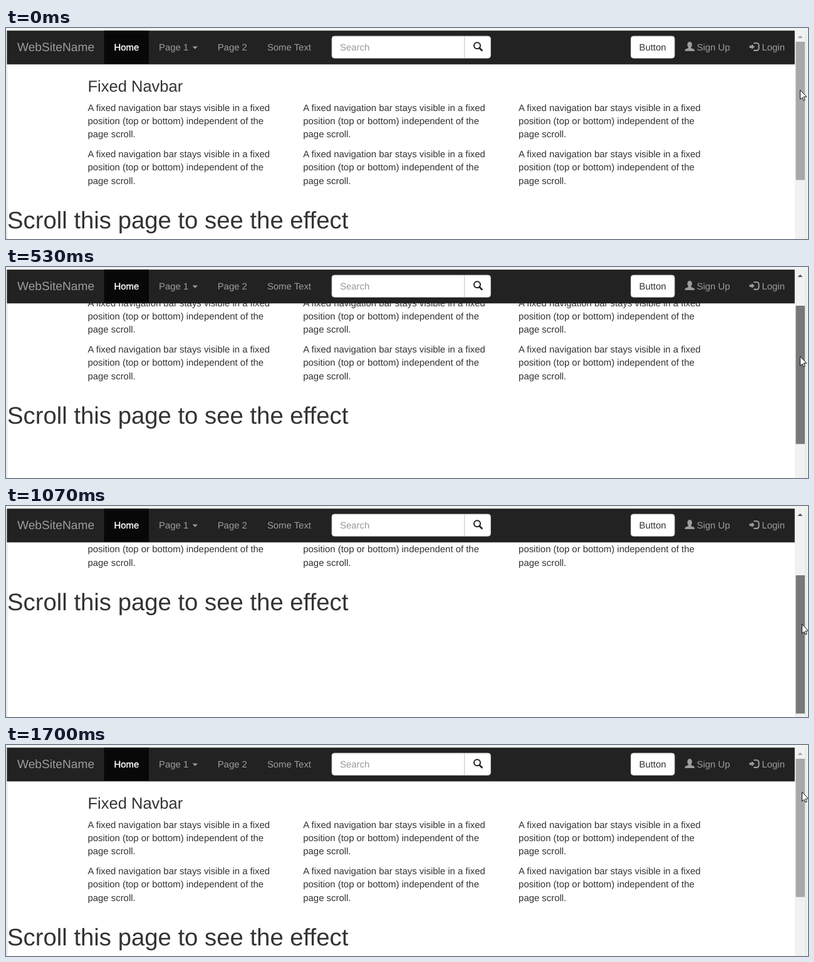
An HTML page that plays this animation: 1280x338 px, repeating every 1770 ms.

```html
<!DOCTYPE html>
<html lang="en">
<head>
<meta charset="utf-8">
<title>Fixed navbar</title>
<style>
  html, body { margin: 0; width: 100%; height: 100%; overflow: hidden; background: #fff; }
  svg { display: block; width: 1280px; height: 338px; }
  text {
    font: 14.9px "Liberation Sans", Arial, sans-serif;
    fill: #333;
    text-rendering: geometricPrecision;
  }
  .h1 { font-size: 38.3px; }
  .h3 { font-size: 25.53px; }
  .nav text { fill: #9d9d9d; }
  .nav .brand { font-size: 19.15px; }
  .nav .active { fill: #fff; stroke: #fff; stroke-width: .35px; }
  .nav .hint { fill: #999; }
  .nav .dark { fill: #333; }
  .box { fill: #fff; stroke: #ccc; }
  .icon { fill: #9d9d9d; }
</style>
</head>
<body>
<svg viewBox="0 0 1280 338">
  <rect width="1280" height="338" fill="#fff"/>

  <g id="page">
    <text class="h3" x="130.5" y="102">Fixed Navbar</text>
    <g id="columns"></g>
    <text class="h1" x="2" y="321">Scroll this page to see the effect</text>
  </g>

  <rect width="1280" height="4" fill="#eff4f3"/>
  <rect width="1" height="338" fill="#f3f4f4"/>
  <rect x="1" y="4" width="1" height="334" fill="#d6d8d8"/>
  <rect x="1259" y="4" width="17" height="334" fill="#f1f1f1"/>
  <rect x="1276" y="4" width="4" height="334" fill="#f0f4f4"/>
  <rect x="1276" y="4" width="1" height="334" fill="#dcdede"/>

  <g class="nav">
    <rect x="1.5" y="4.2" width="1257.3" height="54.1" fill="#222"/>
    <rect x="156.5" y="4.2" width="71.5" height="53.2" fill="#080808"/>
    <text class="brand" x="18" y="37">WebSiteName</text>
    <text class="active" x="172.5" y="36">Home</text>
    <text x="244" y="36">Page 1</text>
    <path class="icon" d="M297.5 29.5h8.6l-4.3 4.3z"/>
    <text x="337.7" y="36">Page 2</text>
    <text x="416.9" y="36">Some Text</text>

    <path class="box" d="M731.8 13.1H524.1a4 4 0 0 0-4 4V44.3a4 4 0 0 0 4 4H731.8z"/>
    <path class="box" d="M731.8 13.1H769.4a4 4 0 0 1 4 4V44.3a4 4 0 0 1-4 4H731.8z"/>
    <text class="hint" x="533" y="36">Search</text>
    <g fill="none" stroke="#222">
      <circle cx="752" cy="28.3" r="5" stroke-width="2"/>
      <path d="M755.6 32l4 4" stroke-width="2.6" stroke-linecap="round"/>
    </g>

    <rect class="box" x="997.4" y="13.1" width="69.6" height="35.2" rx="4"/>
    <text class="dark" x="1010.5" y="36">Button</text>

    <ellipse class="icon" cx="1091.2" cy="26.8" rx="3.8" ry="4.8"/>
    <path class="icon" d="M1089 30h4.4v2l4.6 2.1q1 .5 1 1.7v1.1h-15.4v-1.1q0-1.2 1-1.7l4.4-2.1z"/>
    <text x="1102.5" y="36">Sign Up</text>

    <path d="M1193.2 24.3h5a3.3 3.3 0 0 1 3.3 3.3v5a3.3 3.3 0 0 1-3.3 3.3H1193.2" fill="none" stroke="#9d9d9d" stroke-width="2.1"/>
    <path class="icon" d="M1186.5 28.3h3.7v-2.4l4.7 4.2-4.7 4.2v-2.4h-3.7z"/>
    <text x="1206.5" y="36">Login</text>
  </g>

  <path id="arrow" d="M1263.5 16l4-4 4 4z"/>
  <rect id="thumb" x="1260.5" y="22" width="14.5" height="221.5"/>
  <path id="cursor" d="M.5 .5V15.2L3.8 12.1 6 17 8.2 16 6 11.2H10.8z" fill="#fff" stroke="#111" stroke-width="1"/>
</svg>

<script>
const byId = id => document.getElementById(id);
const page = byId('page'), arrow = byId('arrow'), thumb = byId('thumb'), cursor = byId('cursor');

const lines = [
  'A fixed navigation bar stays visible in a fixed',
  'position (top or bottom) independent of the',
  'page scroll.'
];
let columns = '';
for (let col = 0; col < 3; col++)
  for (let row = 0; row < 2; row++)
    lines.forEach((line, i) => {
      const x = 130.5 + col * 343.8;
      const y = Math.round(132.6 + row * 74.5 + i * 21.28);
      columns += `<text x="${x}" y="${y}">${line}</text>`;
    });
byId('columns').innerHTML = columns;

const LOOP = 1770;
const SCROLL_PER_THUMB_PX = 1.73;

// start time, page scroll, cursor x, cursor y, thumb held
const steps = [
  [0, 0, 1267, 99, false],
  [150, 0, 1267, 99, true],
  [380, 19, 1267, 111, true],
  [460, 42, 1267, 127, true],
  [530, 70, 1267, 143, true],
  [610, 107, 1268, 165, true],
  [690, 142, 1270, 185, true],
  [760, 154, 1270, 191, true],
  [840, 158, 1270, 193, true],
  [1070, 154, 1270, 189, true],
  [1160, 119, 1270, 169, true],
  [1230, 73, 1270, 143, true],
  [1310, 29, 1270, 118, true],
  [1390, 4, 1270, 103, true],
  [1470, 0, 1270, 88, true],
  [1530, 0, 1270, 75, true],
  [1700, 0, 1270, 75, false]
];

function draw(time) {
  const [, scroll, x, y, held] = steps.findLast(step => step[0] <= time);
  page.setAttribute('transform', `translate(0 ${-scroll})`);
  thumb.setAttribute('y', 22 + Math.floor(scroll / SCROLL_PER_THUMB_PX));
  thumb.setAttribute('fill', held ? '#787878' : '#a8a8a8');
  arrow.setAttribute('fill', scroll ? '#505050' : '#a3a3a3');
  cursor.setAttribute('transform', `translate(${x} ${y})`);
}

const start = performance.now();
function tick() {
  draw((performance.now() - start) % LOOP);
  requestAnimationFrame(tick);
}
tick();
</script>
</body>
</html>
```
